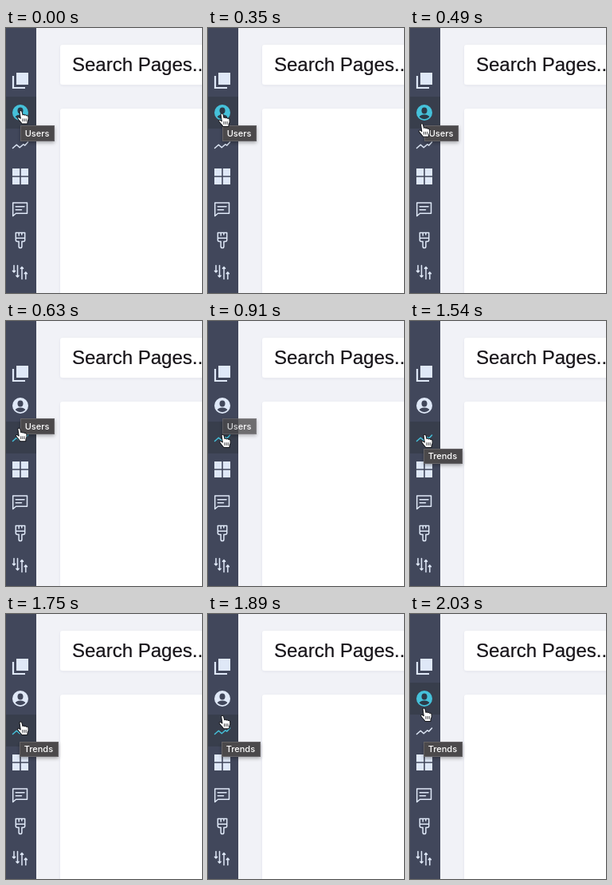
Recreate the animation shown at these times as an HTML page. Size 246 by 332 pixels, loop 2100 ms.

```html
<!DOCTYPE html>
<html lang="en">
<head>
<meta charset="utf-8">
<title>Sidebar tooltips</title>
<style>
  html, body { margin: 0; width: 100%; height: 100%; overflow: hidden; background: #f1f2f7; }
  svg { display: block; width: 246px; height: 332px; }
  .line { fill: none; stroke: #dfe8f7; stroke-width: 1.5; stroke-linejoin: round; stroke-linecap: round; }
  .solid { fill: #dfe8f7; }
  .search { font: 24px "Liberation Sans", Arial, sans-serif; fill: #161318; stroke: #161318; stroke-width: .2; }
  .tip rect { fill: #4b4a4b; stroke: #656466; stroke-width: 1; }
  .tip text { font: 500 11px Inter, sans-serif; fill: #fff; }
</style>
</head>
<body>
<svg viewBox="0 0 246 332" xmlns="http://www.w3.org/2000/svg">
  <defs>
    <filter id="soft" x="-20%" y="-20%" width="140%" height="140%">
      <feDropShadow dx="0" dy="1" stdDeviation="1.5" flood-color="#394060" flood-opacity=".07"/>
    </filter>
    <filter id="drop" x="-30%" y="-30%" width="160%" height="190%">
      <feDropShadow dx="0" dy="2" stdDeviation="2" flood-opacity=".3"/>
    </filter>
    <clipPath id="disc"><circle cx="18" cy="106" r="8.3"/></clipPath>
  </defs>

  <rect width="246" height="332" fill="#f1f2f7"/>
  <g fill="#fff" filter="url(#soft)">
    <rect x="68" y="21" width="190" height="50" rx="3"/>
    <rect x="68" y="101" width="190" height="245" rx="3"/>
  </g>
  <text class="search" x="83" y="54">Search Pages...</text>

  <rect width="38" height="332" fill="#41475b"/>
  <rect id="row" width="38" height="40" fill="#383e4c"/>

  <!-- pages -->
  <rect class="solid" x="13" y="56" width="15" height="15"/>
  <path class="line" d="M9 60V75H24" style="stroke-width:2.2; stroke-linejoin:miter; stroke-linecap:butt"/>

  <!-- users -->
  <circle id="user" cx="18" cy="106" r="10"/>
  <g id="person" clip-path="url(#disc)">
    <ellipse cx="18" cy="103.6" rx="3.5" ry="4"/>
    <ellipse cx="18" cy="113.2" rx="7" ry="4.8"/>
  </g>

  <path id="trend" class="line" d="M8.5 150.5L13.3 146.3L17.2 149.7L21.8 145.8L23.8 147L27.5 143"/>
  <path id="grid" class="solid"/>

  <!-- comments -->
  <path class="line" d="M8.7 219H26.5V232.3H12.5L8.7 235.5ZM12.2 223.7H23M12.2 227.7H19.5"/>

  <!-- brush -->
  <path class="line" d="M12.3 256.5H23.7V265.5Q23.7 267.5 21.7 267.5H19.9V273.5Q19.9 275.6 18 275.6T16.1 273.5V267.5H14.3Q12.3 267.5 12.3 265.5ZM12.3 263.3H23.7M16.2 256.7V260M19.8 256.7V259"/>

  <path id="sort" class="line"/>

  <g id="users" class="tip">
    <rect x="18.5" y="122.5" width="42" height="19" filter="url(#drop)"/>
    <text x="23.7" y="136">Users</text>
  </g>
  <g id="trends" class="tip">
    <rect x="17.5" y="160.5" width="48" height="18" filter="url(#drop)"/>
    <text x="22.7" y="173">Trends</text>
  </g>

  <g id="hand">
    <path d="M-1.5 1.3C-1.5 -.5 1 -.5 1.3 1.2L2.3 5.4C2.8 4.5 4.3 4.7 4.6 5.8C5.2 5 6.6 5.3 6.9 6.4C7.7 5.8 8.9 6.4 9.1 7.6C9.5 10 9.3 12 8.2 13.6L8 16.4H1.2C.2 14.2 -2.6 12.2 -3.8 9.6C-4.2 8.2 -2.5 7.7 -1.5 8.8L-.3 9.8Z"
      fill="#fff" stroke="#15171c" stroke-width="1" stroke-linejoin="round"/>
    <path d="M2.2 10V13.7M4.3 10V13.7M6.4 10V13.7" stroke="#15171c" stroke-width=".8" fill="none"/>
  </g>
</svg>
<script>
  const LOOP = 2100, STEP = 70, SWAP = 1050, RISE = 1540;
  const PALE = "#dfe8f7", TEAL = "#45c1da", BASE = "#41475b", DARK = "#2c3a48";
  const $ = id => document.getElementById(id);
  const clamp = v => Math.min(1, Math.max(0, v));
  const smooth = k => k * k * (3 - 2 * k);

  const tile = (x, y) => `M${x} ${y}h9.2v9.2h-9.2z`;
  $("grid").setAttribute("d", [0, 1, 2, 3]
    .map(i => tile(8 + 10.8 * (i % 2), 176 + 10.8 * (i >> 1))).join(""));

  // shaft from y0 to y1 with a small head at y1
  function arrow(x, y0, y1) {
    const back = y1 - 1.8 * Math.sign(y1 - y0);
    return `M${x} ${y0}V${y1}M${x - 1.6} ${back}L${x} ${y1}L${x + 1.6} ${back}`;
  }
  $("sort").setAttribute("d",
    arrow(10, 297.5, 306) + arrow(14.5, 297.5, 312) + arrow(20, 314.5, 299.5) + arrow(24.8, 314.5, 306));

  // down to the second row, rest, then speed up on the way back
  function pointer(t) {
    const down = smooth(clamp((t - 250) / 535));
    const up = clamp((t - RISE) / 490);
    return [
      18.6 - 3.6 * Math.sin(Math.PI * down) - up ** 3,
      103.5 + 38.7 * down - 24.2 * up ** 1.44
    ];
  }

  function draw(t) {
    const [x, y] = pointer(t);
    const onUser = y < 126;
    $("hand").setAttribute("transform", `translate(${x} ${y}) scale(1.04 1)`);
    $("row").setAttribute("y", onUser ? 86 : 126);
    $("user").setAttribute("fill", onUser ? TEAL : PALE);
    $("person").setAttribute("fill", onUser ? DARK : BASE);
    $("trend").style.stroke = onUser ? PALE : TEAL;
    $("users").setAttribute("opacity", smooth(clamp((SWAP - t) / 200)));
    $("trends").setAttribute("opacity", t < SWAP ? 0 : 1);
  }

  const start = performance.now();
  function tick() {
    const t = (performance.now() - start) % LOOP;
    draw(Math.floor(t / STEP) * STEP);
    requestAnimationFrame(tick);
  }
  draw(0);
  requestAnimationFrame(tick);
</script>
</body>
</html>
```
